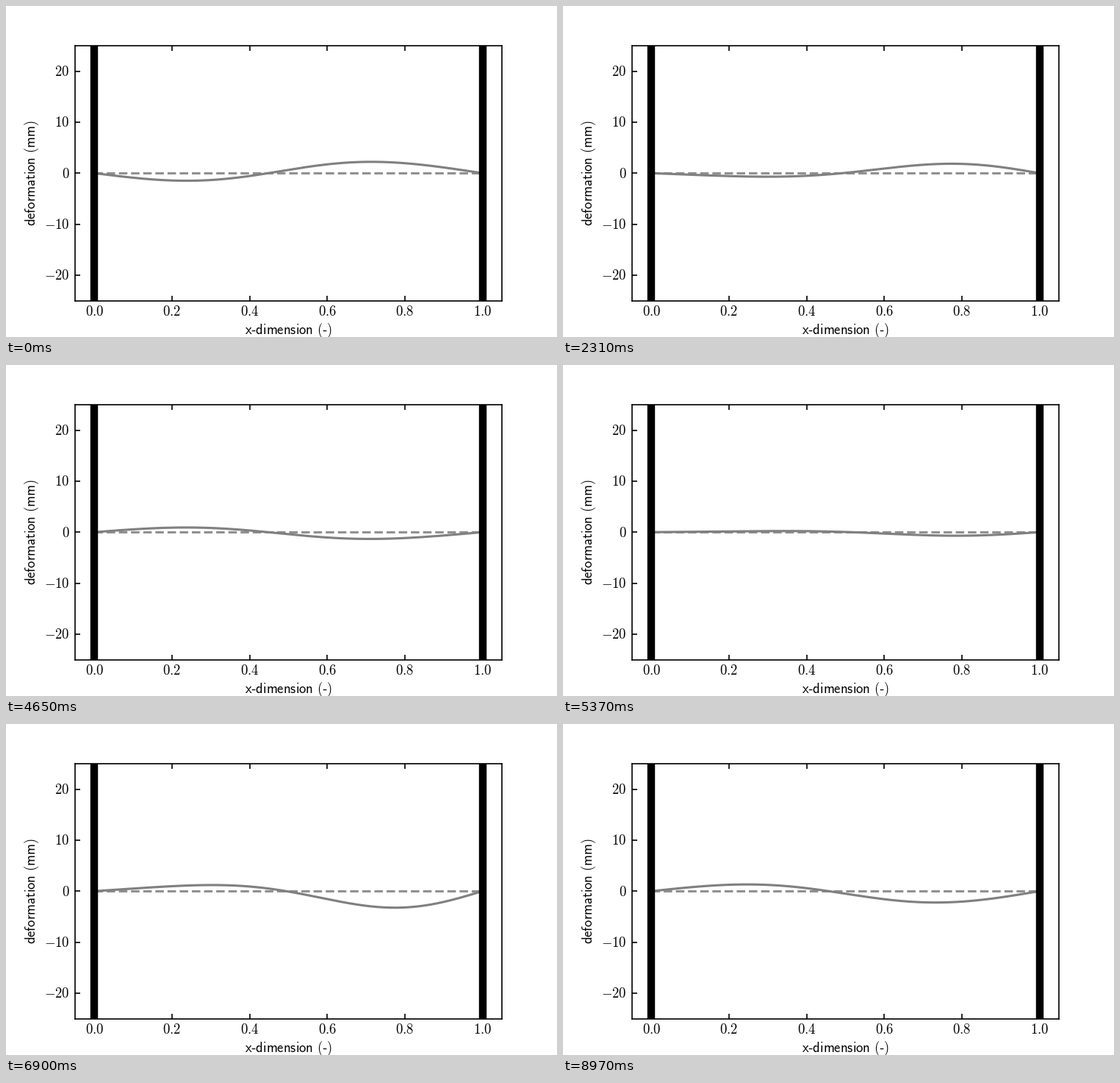
Recreate the animation shown at these times as a matplotlib script. Size 750 px wide and 450 px high, loop 9 s.

```python
import numpy as np
import matplotlib.pyplot as plt
from matplotlib.animation import FuncAnimation

W, H, DPI = 750, 450, 150
FRAMES, STEP = 300, 30
PX_PER_MM = 0.88 * 0 + 0.77 * 0 + 6.93

plt.rcParams["mathtext.fontset"] = "cm"

fig = plt.figure(figsize=(W / DPI, H / DPI), dpi=DPI, facecolor="white")
ax = fig.add_axes([0.125, 0.11, 0.775, 0.77])
ax.set_xlim(-0.05, 1.05)
ax.set_ylim(-25, 25)
ax.set_xticks(np.linspace(0, 1, 6))
ax.set_yticks(range(-20, 21, 10))
ax.tick_params(direction="in", top=True, labelbottom=False, labelleft=False)


def label(x, y, text, **kw):
    """Text at pixel position, y measured from the top to the baseline."""
    kw = {"ha": "center", "va": "baseline", "fontsize": 9, **kw}
    fig.text(x / W, 1 - y / H, text, **kw)


def to_px(x, y):
    px, py = ax.transData.transform((x, y))
    return px, H - py


for v in np.linspace(0, 1, 6):
    label(to_px(v, 0)[0], 420.7, f"${v:.1f}$")
for v in range(-20, 21, 10):
    label(86.5, to_px(0, v)[1] + 6.3, f"${v}$", ha="right")
label(384, 446, "$\\mathsf{x\u2010dimension\\ (\u2010)}$")
label(39.5, 227.5, r"$\mathsf{deformation\ (mm)}$",
      rotation=90, rotation_mode="anchor")

# Two vibration modes, each a mix of the first four sine harmonics (pixels)
x = np.linspace(0, 1, 301)
sines = np.sin(np.pi * np.outer(np.arange(1, 5), x))
slow = np.array([4.68, -14.0, 2.2, 0.1]) @ sines / PX_PER_MM
fast = np.array([0.67, -1.05, 2.7, -0.4]) @ sines / PX_PER_MM

ax.plot([0, 1], [0, 0], "--", color="0.57", lw=1.5, zorder=2)
beam, = ax.plot([], [], color="0.5", lw=1.5, zorder=2.1)
for wall in (0, 1):
    ax.axvline(wall, color="black", lw=5, zorder=2.3)


def update(n):
    q_slow = np.cos(0.0966 * n - 0.2)
    q_fast = -np.cos(2 * np.pi * n / 28.9)
    beam.set_data(x, q_slow * slow + q_fast * fast)
    return beam,


anim = FuncAnimation(fig, update, frames=FRAMES, interval=STEP,
                     repeat=True, repeat_delay=0, blit=False)
plt.show()
```
